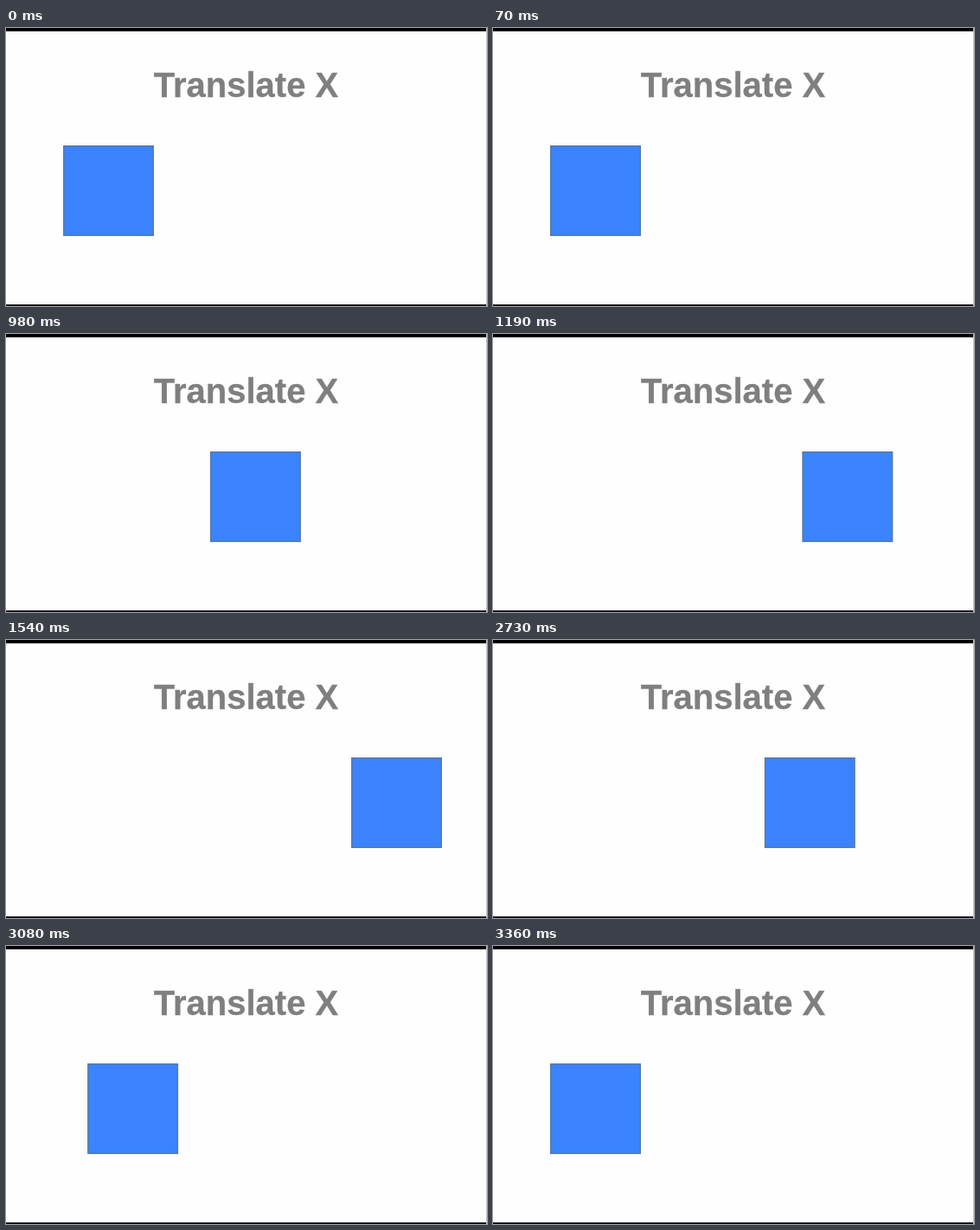
Recreate the animation shown at these times as an HTML page. Size 556 by 322 pixels, loop 4.9 s.

```html
<!DOCTYPE html>
<html lang="en">
<head>
<meta charset="utf-8">
<title>Translate X</title>
<style>
  html, body { margin: 0; width: 100%; height: 100%; overflow: hidden; background: #fefefe; }
  svg { display: block; }
  text { font: bold 40px "Liberation Sans", Arial, sans-serif; fill: #7f7f7f; stroke: #7f7f7f; stroke-width: 0.3; text-anchor: middle; }
  #box { fill: #3b83ff; stroke: #587aa8; stroke-width: 1.5; }
</style>
</head>
<body>
<svg width="556" height="322" viewBox="0 0 556 322">
  <rect width="556" height="322" fill="#fefefe"/>
  <rect width="556" height="3.8"/>
  <rect y="320.2" width="556" height="1.8"/>
  <rect x="555" width="1" height="322" fill="#c4c4c4"/>
  <text x="277.5" y="79.6">Translate X</text>
  <rect id="box" x="66.75" y="136.75" width="103.5" height="103.5"/>
</svg>
<script>
const LOOP = 4900, STEP = 70, DISTANCE = 333;
const box = document.getElementById('box');

// CSS-style cubic-bezier easing, solved by bisection
function bezier(x1, y1, x2, y2) {
  const at = (a, b, s) => 3 * a * s * (1 - s) ** 2 + 3 * b * s * s * (1 - s) + s ** 3;
  return t => {
    if (t <= 0) return 0;
    if (t >= 1) return 1;
    let lo = 0, hi = 1;
    for (let i = 0; i < 30; i++) {
      const mid = (lo + hi) / 2;
      if (at(x1, x2, mid) < t) lo = mid; else hi = mid;
    }
    return at(y1, y2, lo);
  };
}

const easeOut = bezier(0.256, 0, 0.145, 1);
const easeBack = bezier(0.25, 0.1, 0.25, 1);

function offset(t) {
  // The way back begins with a jump
  if (t < 2730) return DISTANCE * easeOut((t - 770) / 750);
  return DISTANCE * (1 - easeBack((t - 2593) / 750));
}

function draw() {
  const t = Math.floor(performance.now() % LOOP / STEP) * STEP;
  box.setAttribute('transform', `translate(${offset(t).toFixed(2)} 0)`);
  requestAnimationFrame(draw);
}
draw();
</script>
</body>
</html>
```
